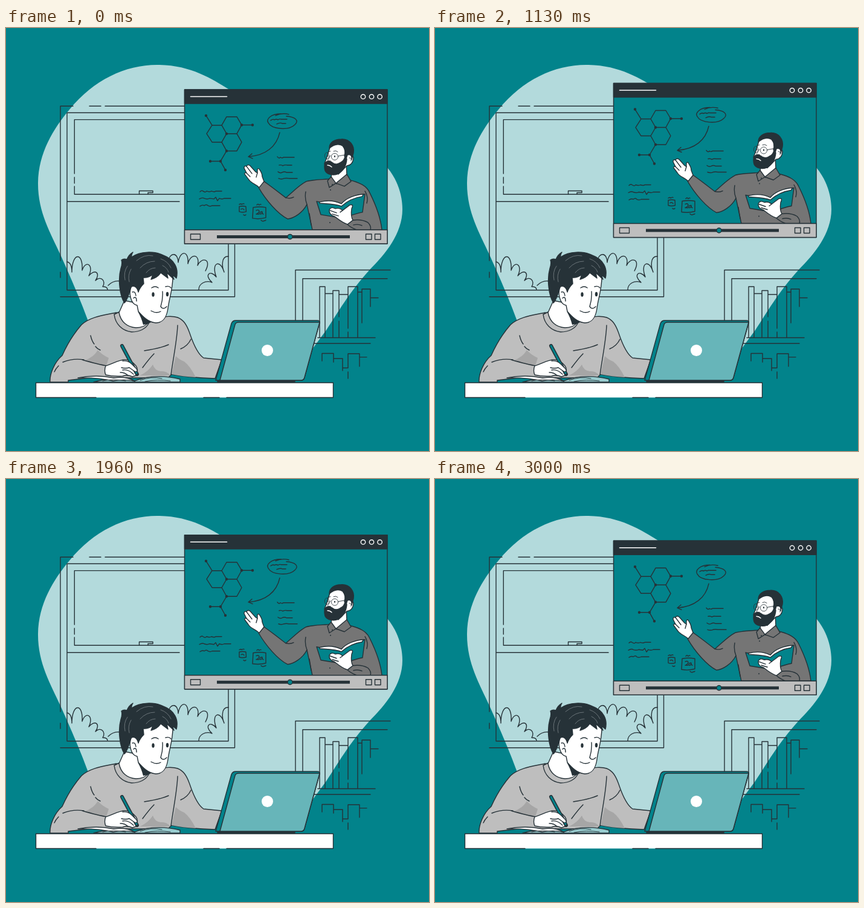
Recreate the animation shown at these times as an HTML page. Size 700 by 700 pixels, loop 3040 ms.

```html
<!DOCTYPE html>
<html>
<head>
<meta charset="utf-8">
<style>
html, body { margin: 0; width: 100%; height: 100%; overflow: hidden; background: #02838b; }
svg { display: block; width: 100vw; height: 100vh; }
.l { fill: none; }
.w { fill: #fff; }
.d { fill: #263238; }
.t { fill: #02838b; }
.g { fill: #bebebe; }
.s { fill: #757575; }
.p { fill: #b3dadc; }
.n { stroke: none; }
</style>
</head>
<body>
<svg viewBox="0 0 700 700" stroke="#263238" stroke-width="1.4" stroke-linecap="round" stroke-linejoin="round">
  <path class="p n" d="M250 61C305 61 340 84 368 101C420 135 470 180 540 195C590 205 618 213 631 231C647 250 656 275 656 300C656 340 628 374 601 401C566 440 550 470 530 500L507 531C480 560 440 570 380 570H220C160 560 146 522 136 485C122 447 110 420 90 375C74 340 53 305 53 258C53 208 78 167 105 135C145 86 197 61 250 61Z"/>

  <!-- room window -->
  <g class="l">
    <path d="M90 385V129.300H111M138 129.300H157M164 129.300H300M90 404V413M90 444.700H378.500V300M300 140.300H101V433.700H368V300M101 287.300H287M300 151.600H113.300V241M113.300 247V257M113.300 262V275.300H300M220.500 275V269.500H243V272.500H235V275"/>
    <path d="M101 387C107 388 109 396 109 404C109 371 128 370 126 401C132 383 146 392 137 410C147 398 157 405 148 418C157 409 166 419 160 428Q168 428 168 433M169 426Q178 417 189 419"/>
    <path d="M268 387C271 370 285 371 285 388C288 367 303 368 301 390C306 371 322 375 317 393C324 378 341 382 330 402M368 378C356 377 357 395 361 404C354 381 339 389 348 412C338 399 327 409 341 421C330 417 319 423 319 433"/>
  </g>

  <!-- bookshelf -->
  <path class="l" d="M636 400.500H479V490M631 414.700H491V490M516 512.500H611M508 522H603M519 512V428H528V512M528 439.500H541V434.500H551V441H566M541 434.500V512M551 441V478M551 485V512M566 497V428H582V512M566 503V512M582 437H589M589 432V488M589 432H603V461M603 446.500H616M523 551V538.500H542V553M542 547H557V567M557 562.500H566V539H585V560M585 544.600H597M566 569V580"/>

  <!-- lesson player -->
  <g id="player">
    <path class="t" d="M295.500 102H631V357H295.500Z"/>
    <path class="d" d="M295.500 102H631V125H295.500Z"/>
    <g class="l" stroke="#fff">
      <path stroke-width="1.600" d="M305.500 113.500H365.500"/>
      <circle cx="591" cy="113.700" r="3.700"/><circle cx="605" cy="113.700" r="3.700"/><circle cx="618.600" cy="113.700" r="3.700"/>
    </g>

    <g class="l">
      <path d="M365 147H382L390 160.500L382 175H365L357 161ZM341 161H357L365 175L357 189H341L332 175ZM365 175L357 189L365 203.500H382L390 189L382 175M331 145L341 161M390 160.500H408M365 203.500L355 220.500H338M355 220.500L363 235"/>
      <path stroke-width="4.400" d="M331 145h0M390 160.500h0M408 160.500h0M338 220.500h0M355 220.500h0M363 235h0M365 203.500h0M365 175h0"/>
      <path d="M455 142C438 142 430 151 434 157C440 168 468 170 478 160C486 153 478 147 464 146M446 145Q457 140 468 143M438 153q4-3 6-1q4-2 6 0q3-2 5-1l10 0M448 159q6-3 9-1l6 0"/>
      <path d="M453 173C448 196 430 211 401 213M407 208L401 213L408 216"/>
      <path d="M449 213q3 4 5 1q3 2 5 0H477M452 227q4-1 6 1q4-2 7-1h8M450 238q4 3 7 1q4-2 7 0h10M451 249q5 2 9 0q4-1 8 0h14"/>
      <path d="M321 271q3-3 5-1q4 3 6 0q5 2 8 0q5 2 7 0h10M320 283q5-3 8-1q5 2 9 0l7 1l3-3l3 6l3-4q5 2 8 0h11M321 295q4-3 7-1q4-3 6 0q4 2 7 0h13"/>
      <path d="M386 295.500Q392 294 397 295.500L397.500 304Q391 306 386 304ZM389 300q3-2 5 1M386 292q3-2 4 0q3-2 4-1M393 309q2 2 4 0M409 297Q420 295 430 297V314Q419 317 408 315ZM414 302q4-2 5 1q0 3-5 5h5M424 304q-4 0-4 3q2 3 4-2q0 3 2 3M415 293q2-3 4 0q2-2 3-1M422 318q3 3 5 1q2 0 3-1"/>
    </g>

    <!-- teacher -->
    <path class="s" d="M497 254C508 251 522 251 533 250L564 246L570 252C585 256 597 261 602 273C612 293 620 315 622 334H507L498 292C491 306 476 315 466 316C450 308 430 285 418 264L427 254C440 263 455 275 463 281C474 272 485 260 497 254Z"/>
    <path class="l" d="M496 271Q494 282 498 292M463 281Q470 283 476 280M502 307L505 326M594 270Q600 280 597 290"/>
    <path class="w" d="M419 264C413 258 405 257 401 250L395 242Q394 239 398 240L394 232Q394 227 398 229Q400 225 404 228L413 238L416 240L416 234Q418 231 420 235Q424 241 424 246L427 254Z"/>
    <path class="l" d="M398 240L404 246M398 229L407 241M416 240L414 247"/>
    <path class="w" d="M539 238L538 250L547 258L564 245L563 222Z"/>
    <path class="s" d="M538 246L532 253L535 264L546 257ZM564 242L571 254L560 262L546 257Z"/>
    <path class="w" d="M536 198L530 217L527 224L532 239L550 242L564 228Q574 227 575 215Q573 207 565 210L559 194Q547 188 536 198Z"/>
    <path class="d" d="M535 199C535 189 544 184 555 184C569 183 577 195 575 207L572 218Q573 208 565 210L563 217L560 212Q563 202 557 195Q547 189 535 199Z"/>
    <path class="d" d="M528 223Q533 218 539 222Q546 228 553 223Q560 220 561 212L564 217C563 229 557 237 550 241C543 245 531 243 528 236Q526 229 528 223Z"/>
    <path class="l" stroke="#fff" d="M532 227q4 0 7 3"/>
    <path class="l" stroke-width=".9" d="M537 211Q533 218 532 219Q533 221 537 220M533 205l4-1M542 204q4-2 7 1M568 215q4-1 3 5M550 212L561 210"/>
    <g class="l" stroke-width=".8"><circle cx="544" cy="213" r="5.600"/><ellipse cx="531" cy="211.500" rx="3.600" ry="5.300"/></g>
    <path stroke-width="2" d="M544 212v1M532 211v1M540 259h0M537 268h0M536 322h0"/>
    <path class="t" d="M514 287C530 290 545 291 555 294C565 283 580 277 594 275L590 305C578 307 566 312 557 315L521 309Z"/>
    <path class="w" d="M519 288C535 284 547 287 555 291C563 281 578 276 592 275L589 279C575 281 563 288 555 295C545 291 532 291 519 290Z"/>
    <path class="s" d="M574 318Q589 316 599 322Q605 328 603 334H580Q570 330 565 325Z"/>
    <path class="w" d="M535 301Q538 295 545 299Q552 297 557 302L569 293Q576 291 572 299C571 306 571 313 574 318L565 325C556 322 549 316 544 312Q534 309 535 301Z"/>
    <path class="l" d="M536 302L547 306M540 308L550 311M557 302L553 305M575 326q8-2 14 1"/>

    <path class="g" d="M295.500 334H631V357H295.500Z"/>
    <path class="l" d="M305.500 341H321.500V350H305.500ZM595.500 341H605V350H595.500ZM610.500 341H620V350H610.500Z"/>
    <path class="l" stroke-width="5" stroke-linecap="butt" d="M349 345.500H569"/>
    <circle class="t" cx="470" cy="345.500" r="4"/>
  </g>

  <!-- student -->
  <path class="g" d="M73 586C72 573 80 553 93 542C101 524 111 507 125 491C140 477 165 475 182 471L235 481C255 479 272 475 284 479C294 483 299 491 304 505C311 526 318 540 327 546L357 549L346 580C320 579 295 577 274 573L268 579H165L145 578L103 583V586Z"/>
  <g class="n" fill="#a6a6a6">
    <path d="M274 573L281 543Q287 549 295 552Q305 560 314 578Q293 577 274 573Z"/>
    <path d="M222 575Q236 568 243 557Q246 567 256 568Q266 567 272 575Z"/>
    <path d="M130 550Q145 545 152 533Q159 541 170 546L166 559Z"/>
  </g>
  <path class="l" d="M284 492C283 518 276 550 273 574M306 515Q301 526 289 531M94 553Q111 546 129 549M126 549C140 553 154 557 167 559M140 509Q142 518 146 523M148 527Q151 531 156 533M229 534Q256 530 269 524M245 539Q238 546 226 562M87 559Q82 564 80 569"/>
  <path class="g" d="M179 474C181 490 192 501 208 503C222 503 232 497 236 489L233 478L187 470Z"/>
  <path class="w" d="M196 451L187 471C190 486 200 495 215 496C225 496 232 492 235 487L240 460Z"/>
  <path class="d n" d="M218 469L240 487L234 490L227 491Q224 479 218 469Z"/>
  <path class="w" d="M207 429C203 438 206 457 217 459L219 469C226 477 235 487 248 488C259 488 266 479 268 464C270 447 277 430 276 408L230 398Z"/>
  <path class="d" d="M207 428C204 437 202 449 196 455C188 442 185 416 190 398Q193 389 191 384Q195 381 200 383Q203 375 210 371Q207 375 208 379C222 369 246 369 260 376C279 383 286 398 282 414L275 408L278 416L266 405L268 414L256 405Q251 413 240 416L243 408Q235 414 227 413L228 423Q221 430 219 437Q216 425 207 428Z"/>
  <path class="l" stroke="#737c80" stroke-width=".9" d="M197 417Q194 404 201 394M204 420Q201 409 207 399M216 385Q229 374 243 377M222 397Q232 386 246 386M256 382Q268 386 273 397M259 393Q267 397 269 404M232 405Q238 397 247 397"/>
  <path class="l" d="M209 437Q214 435 215 443M211 447Q216 443 216 452M241 430Q247 426 252 430M264 428Q270 426 273 430M259 436Q260 448 256 461Q260 467 266 461M240 468Q249 473 256 469"/>
  <g class="d n"><ellipse cx="243.500" cy="441" rx="2.200" ry="3.800"/><ellipse cx="267" cy="440.500" rx="2.200" ry="3.800"/></g>

  <!-- notebook, hand and pen -->
  <path fill="#99cdd0" d="M145 586Q175 577 213 584Q246 571 288 581V586Z"/>
  <path class="w" d="M119 579Q150 573 178 579Q199 576 213 584Q195 581 177 584Q151 578 119 579Z"/>
  <path class="l" stroke-width="1" d="M160 584q18-4 38 0M222 583q18-7 36-3M230 585q20-4 42-1M213 584v2"/>
  <path class="w" d="M165 559C176 556 186 549 197 549Q207 549 215 559Q220 566 215 575L209 577Q201 573 193 576Q177 577 165 574Q162 567 165 559Z"/>
  <path stroke-width="6" d="M192 526L217 573"/>
  <path stroke="#02838b" stroke-width="3" d="M192 526L216 571"/>
  <path class="w" d="M193 551Q202 550 208 556L216 564Q219 569 214 569L204 562Q197 564 191 562"/>
  <path class="l" d="M193 566Q202 564 211 573M189 570Q197 570 202 575"/>

  <!-- laptop -->
  <path class="d" d="M350 583H478V586H350Z"/>
  <path class="t" d="M347 583L373 489Q375 484 380 484H515Q520 484 519 488L494 578Q493 583 488 583Z"/>
  <path fill="#67b5b9" d="M354 583L379 491Q380 487 385 487H519L494 578Q493 583 488 583Z"/>
  <circle class="w n" cx="432.500" cy="533.500" r="9.500"/>

  <!-- desk -->
  <path class="w n" d="M49.500 587H541.500V611.500H49.500Z"/>
  <path class="l" d="M149 611.500H49.500V587H541.500V611.500H365M353 611.500H327"/>
</svg>
<script>
const LOOP = 3040, RISE = 14, LEAD = 40, REST = 0.3;
const player = document.getElementById('player');

// The player drifts up and back at constant speed.
function draw() {
  const phase = (performance.now() + LEAD) % LOOP / LOOP;
  const lift = RISE * (1 - Math.abs(1 - 2 * phase));
  player.setAttribute('transform', `translate(0 ${REST - lift})`);
  requestAnimationFrame(draw);
}
draw();
</script>
</body>
</html>
```
